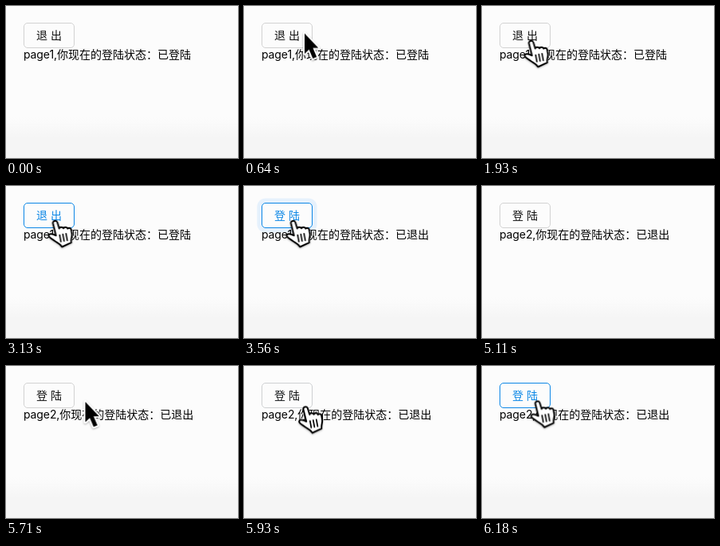
Recreate the animation shown at these times as an HTML page. Size 291x191 px, loop 8000 ms.

```html
<!DOCTYPE html>
<html lang="zh-CN">
<head>
<meta charset="utf-8">
<title>page</title>
<style>
html, body { margin: 0; width: 100%; height: 100%; overflow: hidden; }
body { background: linear-gradient(#fcfcfc 140px, #f5f5f5 166px); }
svg { display: block; width: 291px; height: 191px; }
text { font: 14px Inter, "Noto Sans CJK SC", "Noto Sans CJK", sans-serif; stroke: none; }
.latin { letter-spacing: -.1px; }

/* one loop is 8 s, so 1% is 80 ms */
.button { animation: tint 8s cubic-bezier(.645, .045, .355, 1) infinite; }
.ring { animation: spread 8s infinite, fade 8s infinite; }
.cursor { animation: move 8s linear infinite, show 8s step-end infinite; }
.arrow { animation: arrow 8s step-end infinite; }
.hand { animation: hand 8s step-end infinite; }
.in { animation: in 8s step-end infinite; }
.out { animation: out 8s step-end infinite; }
.out1 { animation: out1 8s step-end infinite; }
.out2 { animation: out2 8s step-end infinite; }
.arrow, .hand { filter: drop-shadow(0 1px 1px rgba(0, 0, 0, .3)); }

@keyframes in { 0% { opacity: 1 } 42.375%, 100% { opacity: 0 } }
@keyframes out { 0% { opacity: 0 } 42.375%, 100% { opacity: 1 } }
@keyframes out1 { 0% { opacity: 0 } 42.375% { opacity: 1 } 63.875%, 100% { opacity: 0 } }
@keyframes out2 { 0% { opacity: 0 } 63.875%, 100% { opacity: 1 } }

@keyframes tint {
  0%, 24.3%, 54.75%, 73.75% { stroke: #d2d2d2; fill: #111 }
  26.6%, 39%, 44.4%, 52.3%, 76.9%, 100% { stroke: #0c87e6; fill: #0c87e6 }
  40.6%, 42.375% { stroke: #0663c4; fill: #0663c4 }
}
@keyframes spread {
  0%, 42.375% { stroke-width: 0; animation-timing-function: cubic-bezier(.08, .82, .17, 1) }
  47.375%, 100% { stroke-width: 12px }
}
@keyframes fade {
  0%, 42.37% { opacity: 0 }
  42.375% { opacity: .2; animation-timing-function: cubic-bezier(.08, .82, .17, 1) }
  67.375%, 100% { opacity: 0 }
}
@keyframes move {
  0%, 6.375% { transform: translate(90.5px, 76px) }
  8%, 8.625% { transform: translate(76px, 34.5px) }
  10% { transform: translate(53px, 39px) }
  11.75%, 50.8% { transform: translate(62.5px, 44px) }
  52.6%, 53.2% { transform: translate(120.5px, 10.5px) }
  53.3%, 70.375% { transform: translate(226px, 6px) }
  71.375%, 72% { transform: translate(99.5px, 45px) }
  73.25% { transform: translate(82px, 55px) }
  75% { transform: translate(74px, 48px) }
  77.2%, 100% { transform: translate(70.5px, 44.5px) }
}
@keyframes show {
  0%, 53.125% { opacity: 0 }
  6.375%, 70.375%, 100% { opacity: 1 }
}
@keyframes arrow {
  0%, 51.6% { opacity: 1 }
  24.125%, 73.75%, 100% { opacity: 0 }
}
@keyframes hand {
  0%, 51.6% { opacity: 0 }
  24.125%, 73.75%, 100% { opacity: 1 }
}
</style>
</head>
<body>
<svg viewBox="0 0 291 191">
  <rect class="ring" x="22" y="21" width="64" height="32" rx="5" fill="none" stroke="#1890ff"/>
  <g class="button">
    <rect x="22.5" y="21.5" width="63" height="31" rx="4.5" fill="#fcfcfc"/>
    <g text-anchor="middle">
      <text class="in" x="54" y="42">退 出</text>
      <text class="out" x="54" y="42">登 陆</text>
    </g>
  </g>
  <g fill="#000">
    <text class="in" x="22" y="66"><tspan class="latin">page1,</tspan>你现在的登陆状态：已登陆</text>
    <text class="out1" x="22" y="66"><tspan class="latin">page1,</tspan>你现在的登陆状态：已退出</text>
    <text class="out2" x="22" y="66"><tspan class="latin">page2,</tspan>你现在的登陆状态：已退出</text>
  </g>
  <g class="cursor" stroke-linejoin="round">
    <path class="arrow" d="M0 0V25.5l5.6-5.3 4.8 11.3 4.8-2-4.8-11.2H17.3z" stroke="#fff" stroke-width="4" paint-order="stroke"/>
    <g class="hand" stroke="#000" stroke-width="2" stroke-linecap="round">
      <path fill="#fff" d="M-3.5 3.2C-4.5-.2.8-1.6 1.9 1.8L4.3 9.5c.3-2.3 4.3-2.6 5.3-.2.8-2.2 4.4-2.2 5.2.3 1.2-1.6 3.9-1 4.4 1.2l.9 5.2c.6 4-1.4 5.5-.8 11.2L7.8 32.5C5.6 28.3 1.5 27.5-1.8 24.8S-9.3 20.5-8.8 18s4-2 9 .3z"/>
      <path fill="none" stroke-width="1.7" d="M4.8 17.5l1.6 8.5M8.8 16.7l1.6 8.5M12.8 15.9l1.6 8.5"/>
    </g>
  </g>
</svg>
</body>
</html>
```
